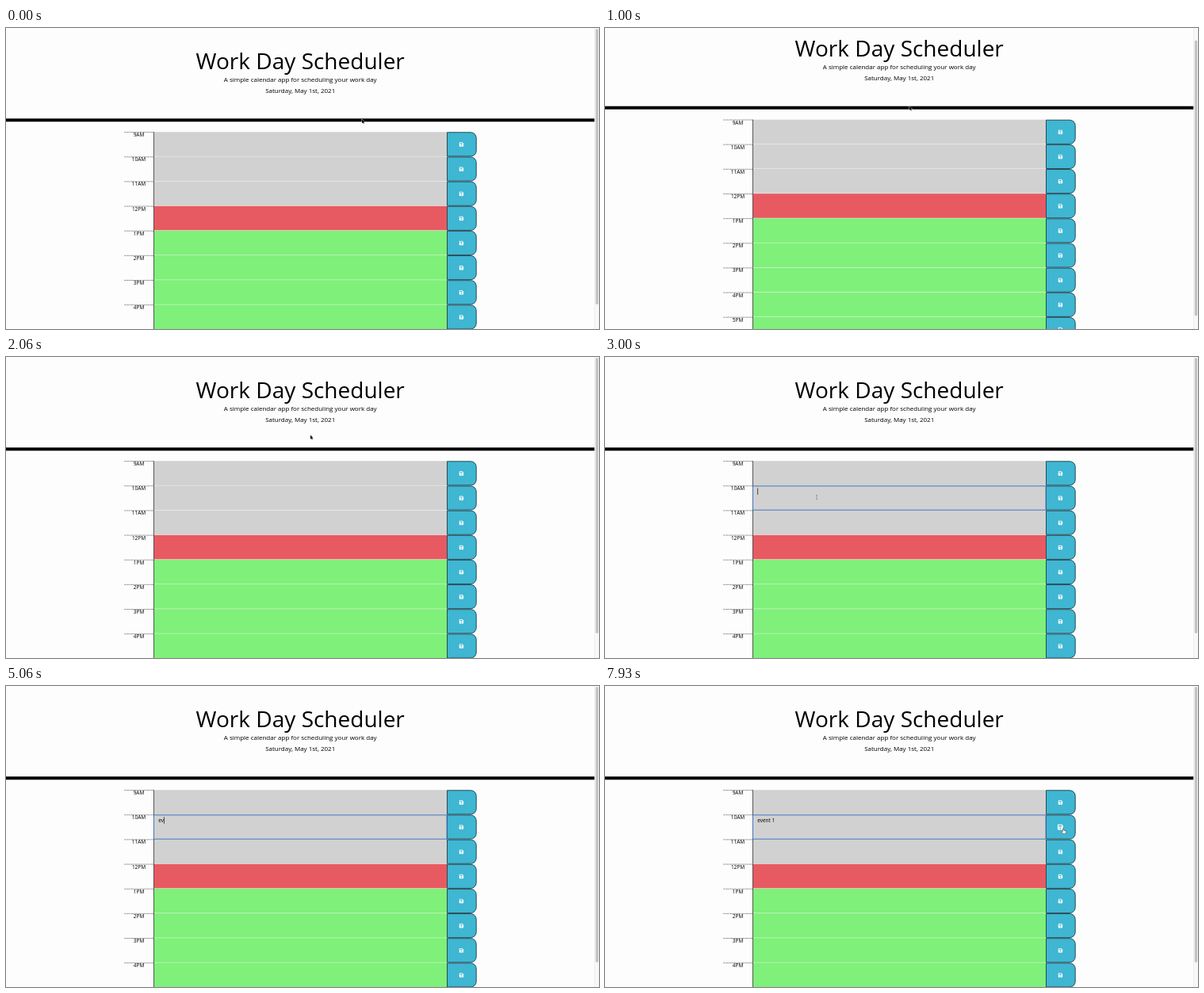
Write an HTML page with a canvas that moves like this. It is 748 px wide and 380 px high and loops after 8000 ms.

```html
<!DOCTYPE html>
<html lang="en">
<head>
<meta charset="utf-8">
<title>Work Day Scheduler</title>
<style>
html, body { margin: 0; width: 100%; height: 100%; overflow: hidden; background: #fdfdfd; }
canvas { display: block; width: 748px; height: 380px; }
</style>
</head>
<body>
<canvas id="stage"></canvas>
<script>
const W = 748, H = 380, LOOP = 8000;
const canvas = document.getElementById('stage');
const ctx = canvas.getContext('2d');
const ratio = window.devicePixelRatio || 1;
canvas.width = W * ratio;
canvas.height = H * ratio;

const FONT = '"Open Sans", "Noto Sans", sans-serif';
const HOURS = ['9AM', '10AM', '11AM', '12PM', '1PM', '2PM', '3PM', '4PM', '5PM'];
const TOP = 131.3, PITCH = 31.15, LEFT = 186.5, RIGHT = 556.5, END = 593.2;
const PAST = '#d1d1d1', NOW = '#e85a61', NEXT = '#7ff07a', BLUE = '#3fb6d2';

// [time, value] pairs; each value holds until the next time
const SCROLL = [[0, 0], [800, 1], [860, 4], [930, 9], [1000, 15.6], [1060, 31.5],
  [1930, 29.8], [2000, 12], [2060, 0]];
const TYPED = [[0, ''], [4860, 'e'], [5060, 'ev'], [5200, 'eve'], [5330, 'even'],
  [5460, 'event'], [5600, 'event '], [5930, 'event 1']];
const CARET = [[0, false], [2730, true], [3260, false], [3860, true], [4200, false],
  [4730, true], [6460, false], [7000, true], [7530, false]];
const FOCUS = 2730;

// [time, x, y] of the pointer
const PATH = [[0, 449, 115], [467, 384, 98.5], [2400, 384, 98.5], [2730, 285, 170],
  [3000, 267, 177], [6930, 267, 177], [7333, 420, 184], [7800, 573, 181], [7933, 578, 180]];

function held(list, t) {
  let v = list[0][1];
  for (const [at, value] of list) if (t >= at) v = value;
  return v;
}

function pointer(t) {
  let i = 0;
  while (i < PATH.length - 2 && t >= PATH[i + 1][0]) i++;
  const [t0, x0, y0] = PATH[i], [t1, x1, y1] = PATH[i + 1];
  const p = Math.min(1, (t - t0) / (t1 - t0));
  const k = p * p * (3 - 2 * p);
  return [x0 + (x1 - x0) * k, y0 + (y1 - y0) * k];
}

function rect(x, y, w, h, color) {
  ctx.fillStyle = color;
  ctx.fillRect(x, y, w, h);
}

function text(str, x, y, size, align = 'center') {
  ctx.font = size + 'px ' + FONT;
  ctx.textAlign = align;
  ctx.fillStyle = '#000';
  ctx.fillText(str, x, y);
}

function poly(points, fill, stroke, width) {
  ctx.beginPath();
  points.forEach(([x, y]) => ctx.lineTo(x, y));
  ctx.closePath();
  ctx.lineWidth = width;
  ctx.strokeStyle = stroke;
  ctx.stroke();
  ctx.fillStyle = fill;
  ctx.fill();
}

function saveIcon(x, y, scale) {
  ctx.save();
  ctx.translate(x, y);
  ctx.scale(scale, scale);
  poly([[-2.4, -2.4], [1.4, -2.4], [2.4, -1.4], [2.4, 2.4], [-2.4, 2.4]], '#fff', '#fff', 0.5);
  rect(-1.7, -1.8, 2.9, 1.3, BLUE);
  ctx.beginPath();
  ctx.arc(0, 1, 0.75, 0, Math.PI * 2);
  ctx.fill();
  ctx.restore();
}

function saveButton(y, hover) {
  ctx.beginPath();
  ctx.roundRect(RIGHT, y + 0.5, END - RIGHT, PITCH - 1, [0, 7, 7, 0]);
  ctx.fillStyle = BLUE;
  ctx.fill();
  ctx.lineWidth = 0.9;
  ctx.strokeStyle = '#1d3c46';
  ctx.stroke();
  saveIcon(574.4, y + 15.7, hover ? 1.3 : 1);
}

function row(i, hover) {
  const y = TOP + i * PITCH;
  ctx.setLineDash([1.5, 1]);
  ctx.lineWidth = 0.7;
  ctx.strokeStyle = '#333';
  ctx.beginPath();
  ctx.moveTo(149.5, y + 0.3);
  ctx.lineTo(LEFT, y + 0.3);
  ctx.stroke();
  ctx.setLineDash([]);
  text(HOURS[i], 167.5, y + 5.8, 6.5);
  rect(LEFT, y, RIGHT - LEFT, PITCH, i < 3 ? PAST : i === 3 ? NOW : NEXT);
  rect(LEFT, y + PITCH - 0.5, RIGHT - LEFT, 0.9, '#f4f4f4');
  rect(LEFT - 0.5, y, 0.8, PITCH, '#333');
  saveButton(y, hover);
}

function field(t) {
  const y = TOP + PITCH, str = held(TYPED, t);
  ctx.lineWidth = 1;
  ctx.strokeStyle = '#3f73bd';
  ctx.strokeRect(LEFT, y + 0.4, RIGHT - LEFT - 0.4, PITCH - 0.8);
  text(str, 192.2, y + 9.4, 6.5, 'left');
  if (held(CARET, t)) rect(192.4 + ctx.measureText(str).width, y + 3, 0.7, 8.4, '#111');
}

function arrow() {
  poly([[0, 0], [0, 5.2], [1.2, 4.2], [2, 6], [2.8, 5.6], [2, 3.9], [3.5, 3.8]],
    '#000', '#fff', 0.8);
}

function beam() {
  ctx.lineWidth = 0.6;
  ctx.strokeStyle = '#777';
  ctx.beginPath();
  ctx.moveTo(0, -2.5);
  ctx.lineTo(0, 2.5);
  for (const y of [-2.5, 2.5]) {
    ctx.moveTo(-0.9, y);
    ctx.lineTo(0.9, y);
  }
  ctx.stroke();
}

function hand() {
  poly([[-0.5, 0], [0.4, 0], [0.6, 2.2], [3.3, 3], [3.5, 4.7], [2.7, 6.5],
    [0, 6.5], [-1.9, 3.9], [-1.3, 3.3], [-0.4, 4]], '#fff', '#111', 0.9);
}

function drawPointer(t, x, y) {
  if (t >= 4860 && t < 7000) return;
  ctx.save();
  ctx.translate(x, y);
  if (t < 2460 || y < TOP) arrow();
  else if (x < RIGHT) beam();
  else hand();
  ctx.restore();
}

function draw(t) {
  const scroll = held(SCROLL, t);
  const step = Math.floor((t + 7) * 0.015) / 0.015;
  const [x, y] = pointer(step);
  ctx.setTransform(ratio, 0, 0, ratio, 0, 0);
  rect(0, 0, W, H, '#fdfdfd');

  ctx.save();
  ctx.translate(0, -scroll);
  text('Work Day Scheduler', 371.2, 52, 28);
  text('A simple calendar app for scheduling your work day', 371.2, 68, 8);
  text('Saturday, May 1st, 2021', 371.2, 82, 8);
  rect(0, 114.3, 743, 4, '#000');
  for (let i = 0; i < HOURS.length; i++) row(i, i === 1 && t > 7000 && x > RIGHT);
  if (t >= FOCUS) field(t);
  ctx.restore();

  rect(742.6, 0, 5.4, H, '#f8f8f8');
  rect(742.4, 0, 0.6, H, '#e6e6e6');
  ctx.beginPath();
  ctx.roundRect(743.8, 1 + scroll * 0.93, 3.4, 348, 1.7);
  ctx.fillStyle = '#c3c3c3';
  ctx.fill();
  drawPointer(t, x, y);
}

function frame() {
  draw(performance.now() % LOOP);
  requestAnimationFrame(frame);
}
frame();
</script>
</body>
</html>
```
